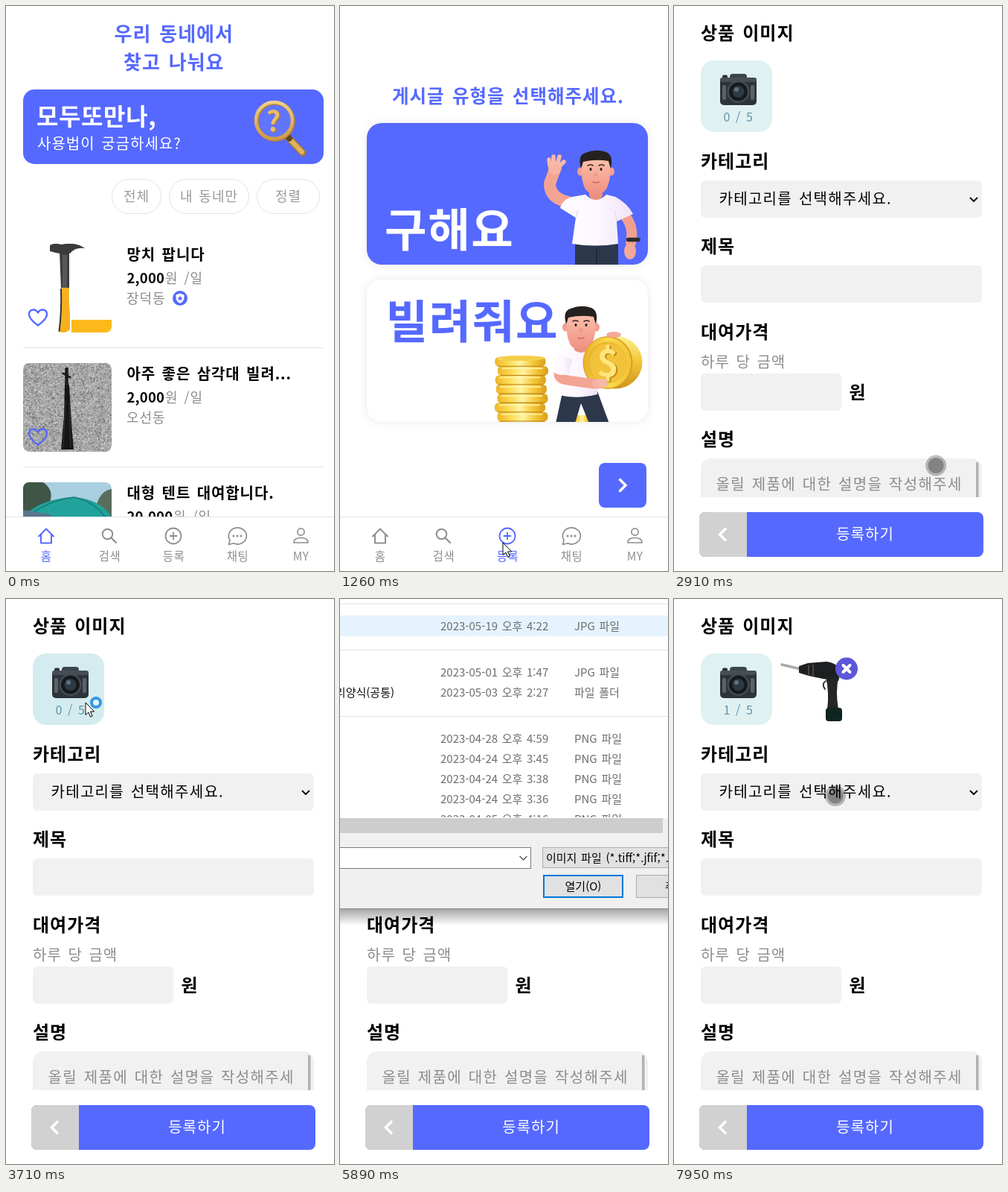
Recreate the animation shown at these times as an HTML page. Size 441x758 px, loop 8000 ms.

```html
<!DOCTYPE html>
<html lang="ko">
<head>
<meta charset="utf-8">
<title>동네 대여 앱</title>
<style>
html, body { margin: 0; width: 100%; height: 100%; overflow: hidden; background: #fff; }
svg { display: block; width: 441px; height: 758px; }
text { font-family: "Noto Sans CJK KR", "Noto Sans CJK", "Noto Sans", sans-serif; }
.card { filter: drop-shadow(0 0 6px rgba(0, 0, 0, .09)); }
.line { fill: none; stroke-linecap: round; stroke-linejoin: round; }
</style>
</head>
<body>
<svg id="stage" viewBox="0 0 441 758" xmlns="http://www.w3.org/2000/svg"></svg>
<script>
const BLUE = '#5569ff', GRAY = '#8e8e93', FIELD = '#f1f1f1', LOOP = 8000;

// cy is the middle of the Hangul glyphs
function T(x, cy, s, size, fill, o = {}) {
  const { w = 400, ls = 1, anchor = 'start', id = '' } = o;
  return `<text ${id && `id="${id}"`} x="${x}" y="${cy + size * .37}" font-size="${size}" font-weight="${w}" fill="${fill}"
    letter-spacing="${ls}" word-spacing="${size * .1}" text-anchor="${anchor}">${s}</text>`;
}
const R = (x, y, w, h, r, fill, more = '') =>
  `<rect x="${x}" y="${y}" width="${w}" height="${h}" rx="${r}" fill="${fill}" ${more}/>`;
const C = (x, y, r, fill, more = '') => `<circle cx="${x}" cy="${y}" r="${r}" fill="${fill}" ${more}/>`;
const E = (x, y, rx, ry, fill, more = '') =>
  `<ellipse cx="${x}" cy="${y}" rx="${rx}" ry="${ry}" fill="${fill}" ${more}/>`;
const P = (d, fill, more = '') => `<path d="${d}" fill="${fill}" ${more}/>`;
const L = (d, stroke, w, more = '') => `<path class="line" d="${d}" stroke="${stroke}" stroke-width="${w}" ${more}/>`;
const G = (id, body, more = '') => `<g id="${id}" ${more}>${body}</g>`;
const grad = (id, dir, ...colors) => `<linearGradient id="${id}" x2="${dir[0]}" y2="${dir[1]}">` +
  colors.map((c, i) => `<stop offset="${i / (colors.length - 1)}" stop-color="${c}"/>`).join('') + '</linearGradient>';
const clip = (id, body) => `<clipPath id="${id}">${body}</clipPath>`;
const DOWN = [0, 1], ACROSS = [1, 0];

const defs = `<defs>
  ${grad('gold', ACROSS, '#eeb42a', '#fbd84e', '#fff3a2', '#f6c838', '#d99f1a')}
  ${grad('coin', ACROSS, '#e9b226', '#fbd951', '#f3c235')}${grad('rim', DOWN, '#fdf08f', '#f3c437', '#cf9318')}
  ${grad('skin', DOWN, '#fdc0ae', '#ee8f7e')}${grad('shirt', ACROSS, '#fffdff', '#fdf7ff', '#f0e3f7')}
  ${grad('shade', DOWN, 'rgba(0,0,0,.36)', 'rgba(0,0,0,0)')}${grad('wood', DOWN, '#f3cf83', '#cf9a48')}
  ${clip('top', R(36, 157, 378, 190, 20))}${clip('low', R(36, 367, 378, 191, 20))}
  ${clip('pic1', R(23, 319, 119, 119, 8))}${clip('pic2', R(23, 479, 119, 119, 8))}${clip('pic3', R(23, 639, 119, 119, 8))}
  ${clip('rows', R(0, 0, 460, 293, 0))}${clip('area', R(0, 600, 441, 59, 0))}
</defs>`;

// ---- home ----
const chip = (x, w, s) => R(x + .5, 232.5, w - 1, 46, 23, '#fff', 'stroke="#e3e3e3"') +
  T(x + w / 2, 255.5, s, 18, '#999', { anchor: 'middle' });
const heart = y => L(`M43 ${y + 10.5}C34 ${y + 4} 31 ${y} 31 ${y - 4}C31 ${y - 11.5} 39.5 ${y - 12.5} 43 ${y - 6.5}
  C46.5 ${y - 12.5} 55 ${y - 11.5} 55 ${y - 4}C55 ${y} 52 ${y + 4} 43 ${y + 10.5}Z`, BLUE, 2.4);
const item = (y, title, price, unitX, place) =>
  T(162.5, y + 15, title, 20, '#000', { w: 700, ls: .9 }) +
  T(162.5, y + 46, price, 18.5, '#000', { w: 700, ls: .2 }) +
  T(unitX, y + 46, '원 /일', 18, '#8c8c8c', { w: 350 }) +
  T(162, y + 73, place, 18, '#8c8c8c', { w: 350 });

function specks(seed, color) {
  let d = '';
  const rnd = () => (seed = (seed * 16807) % 2147483647) / 2147483647;
  for (let i = 0; i < 1100; i++) d += `M${(23 + rnd() * 119).toFixed(1)} ${(479 + rnd() * 119).toFixed(1)}h1.5`;
  return `<path d="${d}" stroke="${color}" stroke-width="1.3"/>`;
}

const hammer = R(23, 319, 119, 119, 8, '#fff') +
  P('M72 330H85V380H74Z', '#3c3f42') + P('M76 334h6v46h-6z', '#56595c') +
  P('M59 321Q66 317 74 320Q94 316 106 325Q93 323 86 332H72Q66 331 59 329Z', '#393b3d') +
  P('M74 378L85 378Q84 396 86 412L86 434Q80 440 71 437Q75 415 74 378Z', '#f6b01e') +
  L('M74 380Q75 410 71.5 436', '#333', 2) + R(88, 421, 54, 17, 0, '#fbb91c');
const tripod = R(23, 479, 119, 119, 8, '#a5a5a5') + specks(11, '#707070') + specks(77, '#d2d2d2') +
  P('M79 508L85 508 88 560 91 595 74 595 78 550Z', '#161616') + L('M81.5 487V510', '#1b1b1b', 4.5) +
  L('M77 493L86 498', '#1b1b1b', 3) + L('M80 530L77 592M85 530L87 592', '#333', 1);
const tent = R(23, 639, 119, 119, 8, '#a9cfe0') + P('M23 639H50Q66 650 58 668L40 690H23Z', '#3f5546') +
  P('M142 648Q128 650 122 668L142 690Z', '#5a6c5c') + P('M23 758V684Q50 660 92 659Q128 662 142 686V758Z', '#21a29b') +
  L('M30 684Q60 662 92 659Q122 666 136 690', '#157d7a', 1.5) + P('M23 676L60 682 66 758H23Z', '#58778d');

const ring = (x, y, color, w) => C(x, y, 24.5, 'none', `stroke="${color}" stroke-width="${w}"`);
const lens = L('M379 176L399 197', '#a2762f', 9.5) + L('M378 175L398 196', '#e0b15c', 6.5) +
  L('M377 173L381 177.5', '#5a4626', 8) + C(361, 154, 24, '#6175ff') +
  ring(361.5, 154.5, '#b5853a', 5.5) + ring(360.5, 153.5, 'url(#wood)', 4.5) +
  T(361, 155, '?', 38, '#a87a30', { w: 900, ls: 0, anchor: 'middle' }) +
  T(359.5, 154, '?', 38, '#e9bd66', { w: 900, ls: 0, anchor: 'middle' });

const home = T(145.5, 37, '우리 동네에서', 26, BLUE, { w: 700 }) + T(158, 75, '찾고 나눠요', 26, BLUE, { w: 700 }) +
  R(23, 112, 404, 100, 15, BLUE) + T(41, 148.5, '모두또만나,', 32, '#fff', { w: 700, ls: .6 }) +
  T(42, 185, '사용법이 궁금하세요?', 20, '#fff') + lens +
  chip(142, 67, '전체') + chip(219, 108, '내 동네만') + chip(337, 85, '정렬') +
  `<g clip-path="url(#pic1)">${hammer}</g><g clip-path="url(#pic2)">${tripod}</g><g clip-path="url(#pic3)">${tent}</g>` +
  heart(418) + heart(578) +
  R(23, 458, 404, 1, 0, '#e2e2e2') + R(23, 618, 404, 1, 0, '#e2e2e2') +
  item(319, '망치 팝니다', '2,000', 214, '장덕동') +
  item(479, '아주 좋은 삼각대 빌려...', '2,000', 214, '오선동') +
  item(639, '대형 텐트 대여합니다.', '20,000', 225, '') +
  C(234, 392, 10, BLUE) + P('M234 385.5L239.5 387.5V392Q239 396.5 234 399Q229 396.5 228.5 392V387.5Z', '#fff') +
  P('M234 388.5l1 2.4 2.6.2-2 1.7.6 2.5-2.2-1.3-2.2 1.3.6-2.5-2-1.7 2.6-.2z', BLUE);

// ---- bottom bar ----
const cur = 'currentColor';
const hoop = (x, y, r, w) => C(x, y, r, 'none', `stroke="${cur}" stroke-width="${w}"`);
const tab = (i, x, label, icon) => G('tab' + i, icon + T(x + .5, 738, label, 15.5, cur, { w: 350, ls: .4, anchor: 'middle' }));
const nav = R(0, 685, 441, 73, 0, '#fff') + R(0, 685, 441, 1, 0, '#e2e2e2') +
  tab(0, 53.5, '홈', L('M44 711.5L54 701.5L64 711.5M47 709V720.5H61V709', cur, 2)) +
  tab(1, 139, '검색', hoop(136.5, 708.5, 6.8, 2) + L('M141.5 713.5L148 720', cur, 2.2)) +
  tab(2, 225, '등록', hoop(225, 711, 10.5, 1.8) + L('M220.5 711H229.5M225 706.5V715.5', cur, 1.8)) +
  tab(3, 311, '채팅', L('M299.5 722.5L301 716.5A12 11 0 1 1 306 720.8Z', cur, 1.7) +
    C(306, 711, 1.5, cur) + C(311, 711, 1.5, cur) + C(316, 711, 1.5, cur)) +
  tab(4, 396, 'MY', hoop(396.5, 705.5, 4.6, 1.7) + L('M387 720Q387 713.5 396.5 713.5Q406 713.5 406 720Z', cur, 1.7));

// ---- choice page ----
const head = (x, y) => E(x - 21, y, 4, 5.5, '#f0a08f') + E(x + 21, y, 4, 5.5, '#f0a08f') +
  R(x - 9, y + 18, 18, 20, 7, '#ea9180') +
  P(`M${x - 19} ${y - 18}H${x + 19}Q${x + 22} ${y + 8} ${x + 14} ${y + 24}Q${x} ${y + 39} ${x - 14} ${y + 24}
    Q${x - 22} ${y + 8} ${x - 19} ${y - 18}Z`, 'url(#skin)') +
  P(`M${x - 20} ${y - 4}Q${x - 25} ${y - 22} ${x - 14} ${y - 25}Q${x} ${y - 31} ${x + 14} ${y - 26}Q${x + 24} ${y - 22} ${x + 20} ${y - 4}
    Q${x + 18} ${y - 10} ${x + 17} ${y - 14}Q${x} ${y - 17} ${x - 17} ${y - 13}Q${x - 18} ${y - 9} ${x - 20} ${y - 4}Z`, '#25211f') +
  L(`M${x - 11} ${y - 8}q4 -2 7 0M${x + 4} ${y - 8}q4 -2 7 0`, '#3b2722', 1.6) +
  E(x - 7, y - 3, 1.5, 2, '#2b1d1a') + E(x + 7, y - 3, 1.5, 2, '#2b1d1a') +
  E(x, y + 4, 3, 2.5, '#f09a88') + L(`M${x - 4} ${y + 14}q4 2 8 0`, '#c9685c', 1.5);

const waver = L('M307 263Q282 258 282 238L288 222', '#f3a493', 16) + E(289, 217, 9, 9.5, '#f7b2a2') +
  L('M282 214L281 206M287 211L287 202M293 210L295 202M296 214L301 209', '#f9b9a9', 5.5) +
  L('M382 280Q396 296 391 318', '#f0a08f', 14) + E(390, 329, 8, 11, '#f4a898') +
  L('M387.5 313.5L401 313.5', '#2c2c30', 5.5) + R(316, 314, 58, 36, 3, '#2d374c') + L('M345 326V347', '#1e2639', 1.5) +
  head(344, 222) +
  P('M330 253Q344 267 358 253L370 256Q386 264 394 279L372 289L374 319Q344 324 312 319L317 284L296 271Q300 257 318 255Z', 'url(#shirt)') +
  L('M372 288Q371 280 369 275M317 284Q319 278 320 274', '#e9dcf2', 1.5);

function coinStack() {
  let s = '';
  for (let i = 7; i >= 0; i--) {
    const x = 208 + 2 * (1 + Math.sin(i * 2.4 - 1)), y = 471 + i * 12.3;
    s += R(x, y, 68, 12.5, 5, 'url(#gold)') + L(`M${x + 6} ${y + 3}H${x + 60}`, '#fff6b0', 1.5) +
      L(`M${x + 4} ${y + 12.2}H${x + 64}`, '#b97f12', 1.1);
  }
  return s + E(243, 472.5, 33, 3.5, '#f4cf4a');
}
const lender = coinStack() + R(315, 549, 22, 12, 4, 'url(#gold)') +
  P('M300 514H345L362 560H335L324 533L316 560H290Z', '#2d374c') + head(324, 431) +
  P('M311 458Q324 472 337 458Q345 466 346 490V521Q318 528 295 522Q300 506 289 489Q295 461 311 458Z', 'url(#shirt)') +
  E(370, 478, 36.5, 35.5, 'url(#rim)') + E(360, 478.5, 33.5, 35.5, '#d8a01f') +
  E(359.5, 478.5, 32, 34, 'url(#coin)') + E(359.5, 478.5, 26, 28, '#e8b42d') + E(360.5, 479.5, 25, 27, '#f1c23a') +
  T(362, 479, '$', 50, '#c08a18', { w: 900, ls: 0, anchor: 'middle' }) + T(360, 478, '$', 50, '#ffe57a', { w: 900, ls: 0, anchor: 'middle' }) +
  E(368, 441, 10, 4, '#f4a898') + L('M297 484Q288 500 306 502Q330 506 347 507', '#f3a493', 13) +
  E(348, 507, 9, 6.5, '#f7b2a2') + L('M349 503L357 503M350 508L358 508', '#f9b9a9', 5) +
  P('M297 467Q286 478 287 491Q296 498 308 493L312 474Z', 'url(#shirt)');

const choice = T(70, 121, '게시글 유형을 선택해주세요.', 24.5, BLUE, { w: 700 }) +
  R(36, 157, 378, 190, 20, '#fff', 'class="card" id="card1"') + R(36, 367, 378, 191, 20, '#fff', 'class="card" id="card2"') +
  T(60, 300, '구해요', 61.5, BLUE, { w: 700, ls: 1.6, id: 'want' }) + T(61.5, 423, '빌려줘요', 61.5, BLUE, { w: 700, ls: 1.6, id: 'lend' }) +
  `<g clip-path="url(#top)">${waver}</g><g clip-path="url(#low)">${lender}</g>` +
  R(348, 613, 64, 60, 8, BLUE) + `<path d="M375.5 634.5L384 643L375.5 651.5" fill="none" stroke="#fff" stroke-width="3.4"/>`;

// ---- form ----
const label = (y, s) => T(36, y, s, 24, '#000', { w: 700 });
const camera = R(75, 91, 23, 10, 4, '#3c454a') + R(65, 92.5, 7, 5, 2, '#2a3034') + R(62, 96, 49, 37, 5, '#2d3439') +
  R(62, 96, 49, 6, 3, '#454f55') + R(65, 106, 5, 20, 2, '#596268') + R(103, 106, 5, 20, 2, '#596268') +
  C(86.5, 115, 15, '#434d53') + C(86.5, 115, 12.5, '#161a1d') + C(86.5, 115, 8, '#2b3a45') + C(84, 112, 3, '#60727f');
const drill = L('M145 88L170 94', '#a9a9a9', 3.5) + P('M168 90L180 86L205 84Q222 86 224 100L221 110L200 107L181 103L168 99Z', '#1d1f20') +
  L('M181 89V102M187 88V104', '#555', 1.5) + P('M204 104L221 106Q217 124 221 148H206Q209 126 204 104Z', '#222627') +
  R(204, 146, 22, 18, 4, '#0d2421') + L('M204 110Q198 114 203 121', '#333', 2);
const form = label(36, '상품 이미지') + R(36, 73, 96, 96, 18, '#e0f1f2', 'id="tile"') + camera +
  T(86.5, 149, '0 / 5', 16, '#5f93a6', { w: 350, ls: .8, anchor: 'middle', id: 'count' }) +
  G('drill', drill + C(232, 93.5, 15, '#5b57d8') + L('M227.5 89L236.5 98M236.5 89L227.5 98', '#fff', 4)) +
  label(208, '카테고리') + R(36, 234, 378, 50, 6, FIELD) + T(60.5, 259, '카테고리를 선택해주세요.', 20, '#000', { w: 350, ls: 1.3 }) +
  L('M398.5 257.5L403 262L407.5 257.5', '#111', 2) +
  label(322.5, '제목') + R(36, 348, 378, 50, 6, FIELD) +
  label(437, '대여가격') + T(36, 478, '하루 당 금액', 20, '#8c8c8c', { w: 350 }) + R(36, 493, 189, 50, 6, FIELD) +
  T(235.5, 518.5, '원', 24, '#000', { w: 700 }) + label(581, '설명') +
  `<g clip-path="url(#area)">${R(36, 607, 378, 90, 14, FIELD)}${R(406, 612, 3.5, 60, 1, '#b2b2b2')}
   ${T(56.5, 642, '올릴 제품에 대한 설명을 작성해주세', 20, '#8c8c8c', { w: 350, ls: 1.3 })}</g>` +
  R(34, 679, 382, 60, 8, BLUE) + P('M42 679H98V739H42Q34 739 34 731V687Q34 679 42 679Z', '#d1d1d1') +
  `<path d="M70 700.5L61.5 709L70 717.5" fill="none" stroke="#fff" stroke-width="3.4"/>` +
  T(257, 709, '등록하기', 20, '#fff', { anchor: 'middle' });

// ---- file dialog ----
const files = [
  [36, '2023-05-19 오후 4:22', 'JPG 파일'], [98, '2023-05-01 오후 1:47', 'JPG 파일'],
  [125, '2023-05-03 오후 2:27', '파일 폴더'], [187, '2023-04-28 오후 4:59', 'PNG 파일'],
  [214, '2023-04-24 오후 3:45', 'PNG 파일'], [241, '2023-04-24 오후 3:38', 'PNG 파일'],
  [268, '2023-04-24 오후 3:36', 'PNG 파일'], [295, '2023-04-05 오후 4:16', 'PNG 파일']];
const D = (x, y, s, c = '#000', anchor = 'start') => T(x, y, s, 15, c, { ls: 0, anchor });
const box = (x, y, w, h, fill, stroke) => R(x + .5, y + .5, w - 1, h - 1, 0, fill, `stroke="${stroke}"`);
const dialog = R(-40, 415, 520, 23, 0, 'url(#shade)') + R(-40, -10, 520, 426, 0, '#f0f0f0') + R(-40, 415, 520, 1, 0, '#8d8d8d') +
  R(-40, -10, 520, 304, 0, '#fff') +
  G('list', R(-40, 22, 520, 28, 0, 'none', 'id="picked"') + R(-40, 0, 520, 27, 0, '#e5f3ff', 'id="hover"') +
    [6, 68, 157].map(y => R(-40, y, 520, 1, 0, '#e3e3e3')).join('') +
    files.map(([y, date, kind]) => D(135, y, date, '#6d6d6d') + D(315, y, kind, '#6d6d6d')).join('') +
    D(73, 125, '리양식(공통)', '#111', 'end'), 'clip-path="url(#rows)"') +
  R(-40, 294, 474, 20, 0, '#cdcdcd') +
  box(-40, 333, 297, 29, '#fff', '#7a7a7a') + L('M242 345.5L246.5 350L251 345.5', '#444', 1.2) +
  box(272, 333, 200, 28, '#e1e1e1', '#adadad') + D(277, 347, '이미지 파일 (*.tiff;*.jfif;*.bmp') +
  R(274, 371, 106, 29, 0, '#e1e1e1', 'stroke="#0078d7" stroke-width="2" id="open"') + D(327, 385.5, '열기(O)', '#000', 'middle') +
  box(398, 370, 107, 31, '#e1e1e1', '#adadad') + D(437, 385.5, '취소');

const pointer = G('touch', C(0, 0, 14, 'rgba(0,0,0,.25)') + C(0, 0, 10.5, 'rgba(0,0,0,.27)')) +
  G('arrow', P('M0 0V16.5L3.9 13L6.6 19.2L9.2 18L6.5 12H11.7Z', '#fff', 'stroke="#000" stroke-width="1"') +
    G('busy', C(14, 0, 6, '#e4f4fb', 'stroke="#3598e6" stroke-width="4"')));

document.getElementById('stage').innerHTML = defs + G('home', home) + G('choice', choice) + G('form', form) +
  G('nav', nav) + G('dialog', dialog) + pointer;

// ---- motion ----
const $ = id => document.getElementById(id);
const show = (id, on) => $(id).setAttribute('display', on ? 'inline' : 'none');
const set = (id, k, v) => $(id).setAttribute(k, v);
const between = (t, a, b) => t >= a && t < b;
const clamp = v => Math.min(1, Math.max(0, v));
const ease = p => p * p * (3 - 2 * p);

const route = [
  [260, 356, 736], [730, 219, 720], [1320, 219, 720], [1780, 250, 470], [1990, 250, 470], [2250, 343.5, 624],
  [2390, 358, 628], [2850, 358, 628], [3520, 107, 139], [4150, 107, 139], [4480, -40, 40], [6350, -60, 86],
  [6780, 170, 300], [6960, 310, 412], [7150, 344, 373], [7640, 344, 373], [7930, 217, 264]];

function at(t) {
  const i = route.findIndex(k => k[0] > t);
  if (i < 0) return route[route.length - 1].slice(1);
  if (i === 0) return route[0].slice(1);
  const [t0, x0, y0] = route[i - 1], [t1, x1, y1] = route[i];
  const p = ease((t - t0) / (t1 - t0));
  return [x0 + (x1 - x0) * p, y0 + (y1 - y0) * p];
}

function draw(t) {
  const [x, y] = at(t), onForm = t >= 2680, lending = t >= 1860;
  show('home', t < 1190);
  show('choice', between(t, 1190, 2680));
  show('form', onForm);
  show('nav', !onForm);
  for (let i = 0; i < 5; i++) set('tab' + i, 'color', i === (t < 1190 ? 0 : 2) ? BLUE : GRAY);

  set('card1', 'fill', lending ? '#fff' : BLUE);
  set('want', 'fill', lending ? BLUE : '#fff');
  set('card2', 'fill', lending ? BLUE : '#fff');
  set('lend', 'fill', lending ? '#fff' : BLUE);

  const loaded = t >= 7640;
  set('tile', 'fill', between(t, 3560, 7280) ? '#d4ecef' : '#e0f1f2');
  $('count').textContent = loaded ? '1 / 5' : '0 / 5';
  show('drill', loaded);

  const vis = t < 7300 ? ease(clamp((t - 3910) / 230)) : 1 - clamp((t - 7300) / 200);
  show('dialog', vis > 0);
  set('dialog', 'opacity', vis);
  set('dialog', 'transform', `translate(0 40) scale(${.97 + .03 * vis}) translate(0 -40)`);
  show('list', t >= 5290);
  set('picked', 'fill', t < 5890 ? 'none' : t < 6150 ? '#e5f3ff' : t < 7280 ? '#cce8ff' : '#d9d9d9');
  const row = files.find(f => f[0] > 90 && Math.abs(y - f[0]) <= 13.5);
  const hovering = between(t, 6350, 7150) && row && y < 293;
  show('hover', hovering);
  if (hovering) set('hover', 'y', row[0] - 13.5);
  const over = t >= 6350 && x > 273 && x < 381 && y > 370 && y < 401;
  set('open', 'fill', !over ? '#e1e1e1' : t < 7280 ? '#e5f1fb' : '#cce4f7');
  set('open', 'stroke', t < 7280 ? '#0078d7' : '#005499');
  set('open', 'stroke-width', t < 7280 ? 2 : 1.3);

  const arrow = between(t, 1190, 1320) || between(t, 3710, 4500) || between(t, 6350, 7500);
  const touch = !arrow && (between(t, 260, 3710) || loaded);
  show('arrow', arrow);
  show('touch', touch);
  show('busy', between(t, 3710, 3770));
  for (const id of ['arrow', 'touch']) set(id, 'transform', `translate(${x} ${y})`);
}

function tick() {
  draw(performance.now() % LOOP);
  requestAnimationFrame(tick);
}
tick();
</script>
</body>
</html>
```
